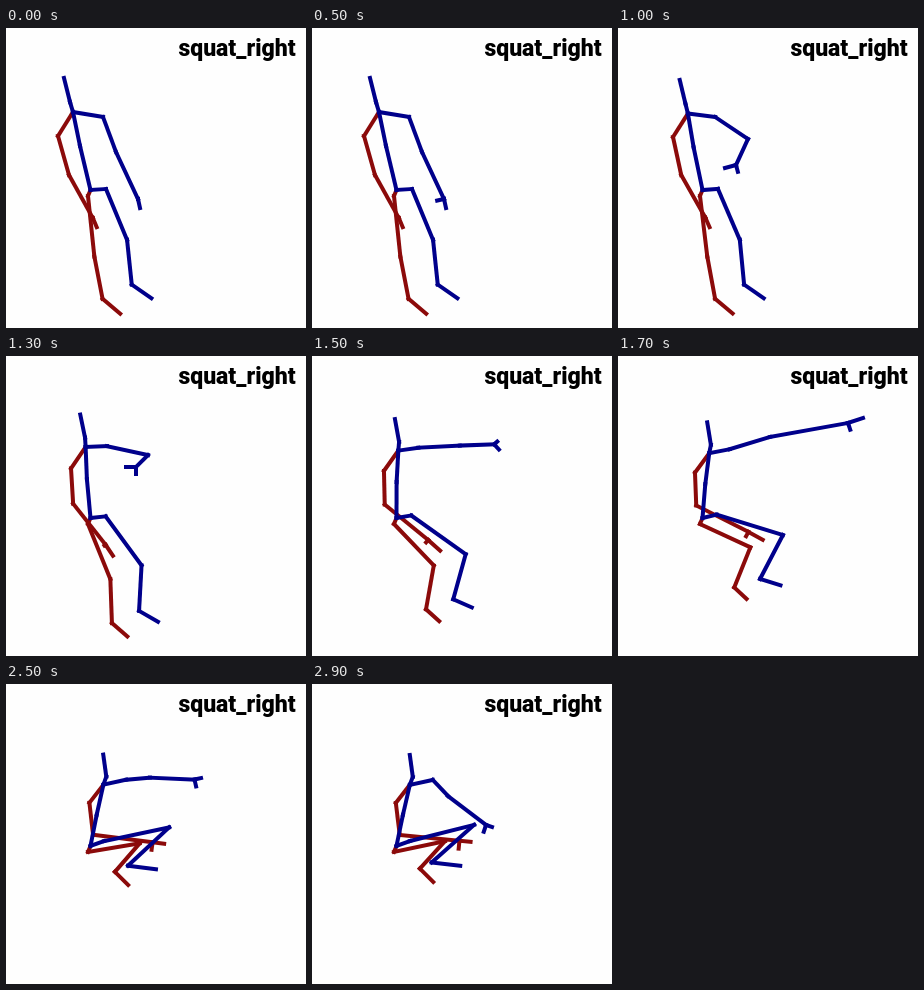
An HTML page with a canvas that plays this animation: 300 by 300 pixels, repeating every 3000 ms.

```html
<!DOCTYPE html>
<html lang="en">
<head>
<meta charset="utf-8">
<title>Squat skeleton</title>
<style>
  html, body { margin: 0; width: 100%; height: 100%; overflow: hidden; background: #fefefe; }
  canvas { display: block; }
</style>
</head>
<body>
<canvas id="stage" width="300" height="300"></canvas>
<script>
const ctx = document.getElementById("stage").getContext("2d");
const LOOP = 3000, STEP = 100, HOLD = 200;
const BLUE = "#00008b", RED = "#8b0a0a";
const BASE = [84.5, 162];

// The free arm hangs, folds, reaches forward and drops.
const reach = [
  { at: 500, elbow: [110, 124], hand: [132, 171], tip: [134, 180] },
  { at: 1000, elbow: [130, 111], hand: [118, 137], tip: [107, 140] },
  { at: 1300, elbow: [142, 99], hand: [130, 111], tip: [120, 111] },
  { at: 1700, elbow: [152, 81], hand: [230, 67], tip: [245, 62] },
  { at: 2100, elbow: [152, 76], hand: [206, 52], tip: [214, 47] },
  { at: 2900, elbow: [136, 112], hand: [174, 141], tip: [180, 143] }
];

const clamp = (v, lo, hi) => Math.min(hi, Math.max(lo, v));
const lerp = (a, b, k) => a + (b - a) * k;
const between = (p, q, k) => [lerp(p[0], q[0], k), lerp(p[1], q[1], k)];

// Slow start, fast middle, long settling.
const squatDepth = t => Math.exp(-Math.exp((1482 - t) / 310));

function polar([x, y], length, degrees) {
  const a = degrees * Math.PI / 180;
  return [x + length * Math.cos(a), y + length * Math.sin(a)];
}

// Turns a bone from its standing to its squatting angle; swell adds length midway.
function swing(from, depth, lengths, angles, swell = 0) {
  const length = lerp(...lengths, depth) + swell * Math.sin(Math.PI * depth);
  return polar(from, length, lerp(...angles, depth));
}

// Catmull-Rom curve through the reach poses.
function reachPoint(joint, t) {
  const last = reach.length - 1;
  let i = 0;
  while (i < last - 1 && t >= reach[i + 1].at) i++;
  const k = clamp((t - reach[i].at) / (reach[i + 1].at - reach[i].at), 0, 1);
  const [a, b, c, d] = [i - 1, i, i + 1, i + 2].map(n => reach[clamp(n, 0, last)][joint]);
  return [0, 1].map(n =>
    b[n] + k / 2 * (c[n] - a[n]
      + k * (2 * a[n] - 5 * b[n] + 4 * c[n] - d[n]
      + k * (3 * (b[n] - c[n]) + d[n] - a[n]))));
}

// Bones are separate strokes, so their caps show at the joints.
function bones(color, ...points) {
  ctx.strokeStyle = color;
  for (let i = 1; i < points.length; i++) {
    ctx.beginPath();
    ctx.moveTo(...points[i - 1]);
    ctx.lineTo(...points[i]);
    ctx.stroke();
  }
}

// The thumb points down, square to the hand.
function drawArm(color, chest, shoulder, elbow, hand, tip, thumb) {
  bones(color, chest, shoulder, elbow, hand, tip);
  const dx = tip[0] - hand[0], dy = tip[1] - hand[1];
  const k = thumb / Math.hypot(dx, dy) * (dx < 0 ? -1 : 1);
  bones(color, hand, [hand[0] - dy * k, hand[1] + dx * k]);
}

function drawRedArm(chest, depth, lean) {
  const shoulder = between([52, 108], [84, 119], lean);
  const elbow = between([63, 147], [88, 151], depth);
  const hand = swing(elbow, depth, [49, 60], [61, 5], 3);
  const tip = swing(elbow, depth, [59, 71], [62, 5], 9);
  drawArm(RED, chest, shoulder, elbow, hand, tip, 8 * depth);
}

function drawBlueArm(chest, depth, t) {
  const shoulder = between([97, 89], [121, 96], depth);
  const [elbow, hand, tip] = ["elbow", "hand", "tip"].map(j => reachPoint(j, t));
  const thumb = 7 * clamp((t - HOLD) / 300, 0, 1);
  drawArm(BLUE, chest, shoulder, elbow, hand, tip, thumb);
}

function drawRedLeg(depth) {
  const hip = [82, 168];
  const knee = swing(hip, depth, [61, 52], [84, -13]);
  const ankle = swing(knee, depth, [43, 37], [79, 133], 4);
  const foot = swing(ankle, depth, [23, 19], [40, 45], -4);
  bones(RED, BASE, hip, knee, ankle, foot);
}

function drawBlueLeg(depth) {
  const hip = between([100, 161], [98, 157], depth);
  const knee = swing(hip, depth, [55, 66], [67.5, -15], 8);
  const ankle = swing(knee, depth, [45, 57], [84, 139], -3);
  const foot = swing(ankle, depth, [24, 29], [35, 6], -6);
  bones(BLUE, BASE, hip, knee, ankle, foot);
}

function draw(now) {
  const t = Math.max(HOLD, Math.floor((now % LOOP) / STEP) * STEP);
  const depth = squatDepth(t);
  const lean = Math.sqrt(depth); // the torso leads the legs
  ctx.fillStyle = "#fefefe";
  ctx.fillRect(0, 0, 300, 300);

  ctx.fillStyle = "#000";
  ctx.font = "900 23px Roboto, sans-serif";
  ctx.textAlign = "center";
  ctx.fillText("squat_right", 231, 28);

  ctx.lineWidth = 4;
  ctx.lineCap = "square";
  const head = between([58, 50], [98, 71], lean);
  const neck = between([64, 74], [101, 93], lean);
  const chest = between([67, 84], [98, 101], lean);
  const waist = between([74, 118], [91, 131], lean);
  drawRedArm(chest, depth, lean);
  drawRedLeg(depth);
  bones(BLUE, head, neck, chest, waist, BASE);
  drawBlueArm(chest, depth, t);
  drawBlueLeg(depth);
}

const start = performance.now();
function tick() {
  draw(performance.now() - start);
  requestAnimationFrame(tick);
}
tick();
</script>
</body>
</html>
```
